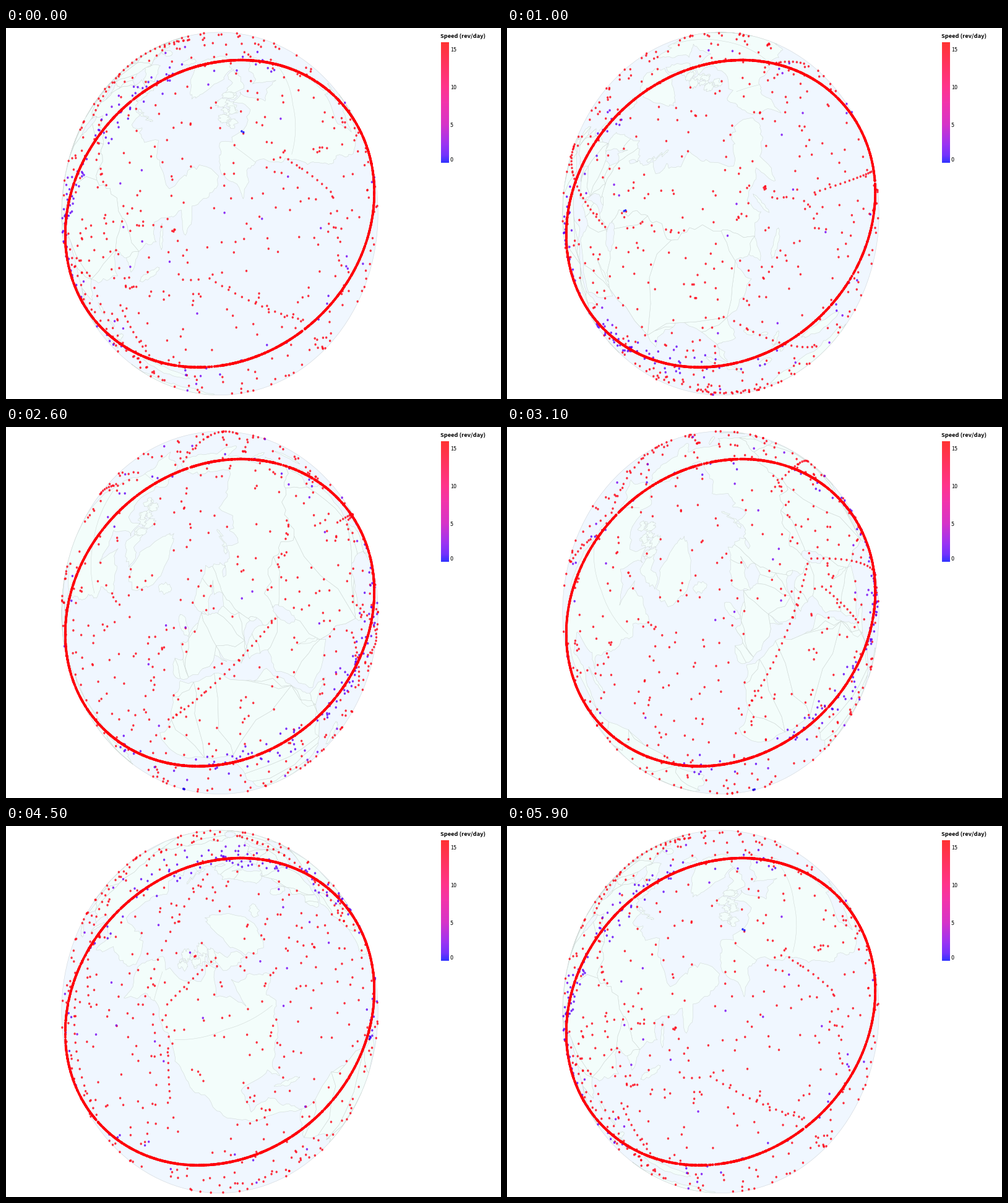
A matplotlib script for the animation above (6 s loop, 800 px wide and 600 px high).

```python
import matplotlib.pyplot as plt
import numpy as np
from matplotlib.animation import FuncAnimation
from matplotlib.collections import LineCollection, PolyCollection
from matplotlib.patches import Ellipse
from matplotlib.path import Path
from matplotlib.transforms import Affine2D

W, H, DPI = 800, 600, 100
FRAMES, INTERVAL = 60, 100
CX, CY, RX, RY = 345.5, 300.3, 255.7, 293.3
TILT, ROLL = np.radians(55), np.radians(22)
OCEAN, LAND, EDGE = "#f0f7ff", "#f3fdfb", "#d0d9d6"
FONT = "Noto Sans CJK JP"
TOP_SPEED, BAR_TOP, BAR_END = 15.93, 23, 218

# key points of the coasts; the detail is added by rough()
RUSSIA_WEST = [(28, 60), (32, 52), (39, 47), (40, 43.5)]
STEPPE = [(47.5, 42), (50, 51), (70, 55), (87, 49.3), (116, 49.8), (131, 43)]
ARCTIC = [(30, 69.5), (41, 67), (34, 64.5), (46, 68), (67, 69), (72, 73),
          (104, 77.7), (130, 71), (160, 69.7), (190, 66), (178, 62.5),
          (163, 60), (157, 51), (155, 59), (137, 54), (140, 48)]
ASIA_COAST = [(128.5, 35), (125, 39), (118, 39), (122, 31), (108, 21),
              (109, 12), (101, 13), (103.5, 1.5), (97, 17), (90, 22),
              (80, 14), (77.5, 8), (72, 21), (57, 26), (48, 30), (56, 25),
              (59, 22), (45, 13), (35, 28), (36, 36), (27, 37), (28, 41)]
EUROPE_COAST = [(30, 46), (28, 41), (23, 37), (14, 45.5), (17, 39.5), (9, 44),
                (-2, 37), (-9, 38), (-8, 43.3), (-1.5, 44), (-4.5, 48.3),
                (8, 54), (10, 57), (12, 54), (20, 55)]
NORDIC = [(28, 60), (30, 69.5), (24, 71), (13, 66), (5, 61), (8, 58),
          (14, 55.5), (18, 61), (25, 65.5), (22, 61)]
NORTH_AMERICA = [
    (-167, 66), (-156, 71.3), (-128, 70), (-96, 68), (-92, 72), (-82, 68),
    (-94, 60), (-82, 55), (-79, 52), (-78, 62), (-65, 59), (-56, 53),
    (-66, 50), (-64, 46), (-70, 43), (-76, 36), (-81, 31), (-80.5, 25.5),
    (-84, 30), (-97, 28), (-96, 19), (-88, 21), (-84, 15), (-78, 8.5),
    (-92, 14.5), (-105.5, 20), (-112, 30), (-118, 34), (-124, 42),
    (-128, 51), (-140, 60), (-152, 59.5), (-163, 55), (-161, 60)]
SOUTH_AMERICA = [(-78, 8.5), (-62, 10.7), (-50, 1), (-35, -6), (-41, -22),
                 (-54, -34), (-68, -52), (-72, -20), (-81, -5)]
AFRICA = [(-6, 35.8), (10, 37), (20, 31), (32, 31), (38, 20), (43, 12),
          (51, 11.8), (40, -4), (40, -15), (33, -28), (20, -35), (12, -17),
          (9, 4), (-8, 4.5), (-17, 15), (-10, 30)]
PARALLEL = [(-124, 49), (-95, 49), (-67, 46)]
MERIDIAN = [(-141, 69.6), (-141, 60)]

# islands: lon, lat, half length, half width (degrees of arc), slope
ISLANDS = [(-42, 72, 11, 5.5, 80), (-72, 68.5, 7, 2.3, -45),
           (-18.5, 65, 2.6, 1.3, 0), (-2.3, 53.8, 3.8, 1.4, 110),
           (57.5, 73.5, 4.6, .8, 55), (138, 36.5, 5, 1, 42),
           (142.7, 50, 4.2, .6, 95), (102, 0, 8, 1.5, -47),
           (140, -5, 9, 2.2, -18), (47, -19, 6.8, 2, 72),
           (-79, 21.8, 5.2, .6, -20), (134, -25, 17, 10, 0)]
CASPIAN = (51, 41.5, 5, 1.9, 110)


def rough(points, closed=True, amp=.13, levels=3):
    """Split every edge and push the midpoints off by a fixed wobble."""
    p = np.array(points, float)
    for _ in range(levels):
        q = np.roll(p, -1, axis=0)
        mid, size = (p + q) / 2, np.hypot(*(q - p).T)
        wobble = np.column_stack([np.sin(mid @ (37, 53)), np.sin(mid @ (71, -29))])
        mid += amp * size[:, None] * wobble
        p = np.stack([p, mid], axis=1).reshape(-1, 2)
        if not closed:
            p = p[:-1]
    return p


def split(shape, depth):
    """Cut a shape in two across its narrowest waist, again and again."""
    if depth == 0 or len(shape) < 6:
        return [shape]
    half = len(shape) // 2
    waist = np.hypot(*(shape[:half] - shape[half:2 * half]).T)
    i = int(waist.argmin())
    j = i + half
    parts = shape[i:j + 1], np.vstack([shape[j:], shape[:i + 1]])
    return split(parts[0], depth - 1) + split(parts[1], depth - 1)


def countries(coast, depth=0):
    return [rough(part, levels=2) for part in split(rough(coast, levels=1), depth)]


def island(lon, lat, a, b, slope):
    t, s = np.linspace(0, 2 * np.pi, 11)[:-1], np.radians(slope)
    x, y = a * np.cos(t), b * np.sin(t)
    dlon = (x * np.cos(s) - y * np.sin(s)) / np.cos(np.radians(lat))
    return rough(np.column_stack([lon + dlon, lat + x * np.sin(s) + y * np.cos(s)]),
                 amp=.2, levels=2)


def archipelago(rng, lon, lat, wide, high, count):
    return [island(lon + rng.uniform(-wide, wide), lat + rng.uniform(-high, high),
                   rng.uniform(1.2, 3.4), rng.uniform(.7, 1.8), rng.uniform(0, 180))
            for _ in range(count)]


# ---------------------------------------------------------------- projection
def project(points, lon0):
    lon, lat = np.radians(points[:, 0] - lon0), np.radians(points[:, 1])
    x, y, z = np.cos(lat) * np.cos(lon), np.cos(lat) * np.sin(lon), np.sin(lat)
    k = z * np.cos(TILT) - x * np.sin(TILT)
    depth = x * np.cos(TILT) + z * np.sin(TILT)
    right = y * np.cos(ROLL) - k * np.sin(ROLL)
    up = k * np.cos(ROLL) + y * np.sin(ROLL)
    return np.column_stack([right, up]), depth


def to_stage(flat):
    return np.column_stack([CX + RX * flat[:, 0], CY - RY * flat[:, 1]])


def locate(px, py, lon0, side):
    """Unit vector of a stage position on the near (1) or far (-1) side."""
    right, up = (px - CX) / RX, (CY - py) / RY
    y = right * np.cos(ROLL) + up * np.sin(ROLL)
    k = up * np.cos(ROLL) - right * np.sin(ROLL)
    depth = side * np.sqrt(max(0, 1 - right**2 - up**2))
    z = k * np.cos(TILT) + depth * np.sin(TILT)
    x = depth * np.cos(TILT) - k * np.sin(TILT)
    lon = np.arctan2(y, x) + np.radians(lon0)
    flat = np.hypot(x, y)
    return np.array([flat * np.cos(lon), flat * np.sin(lon), z])


def near_shapes(shapes, lon0):
    """Outlines of the near side; hidden points are pushed to the limb."""
    out = []
    for shape in shapes:
        flat, depth = project(shape, lon0)
        if (depth > 0).any():
            far = depth < 0
            flat[far] /= np.hypot(*flat[far].T)[:, None]
            out.append(to_stage(flat))
    return out


def near_lines(lines, lon0):
    out = []
    for line in lines:
        flat, depth = project(line, lon0)
        flat[depth < 0] = np.nan
        out.append(to_stage(flat))
    return out


# ---------------------------------------------------------------- satellites
# rows of satellites: viewing longitude, start x y, end x y, count, side
TRAINS = [(21.4, 270, 470, 435, 310, 25, 1), (180, 329, 405, 480, 472, 16, 1),
          (119, 367, 474, 500, 515, 15, 1), (180, 470, 222, 525, 265, 8, 1),
          (-45.8, 405, 224, 497, 226, 12, -1), (-45.8, 370, 195, 520, 115, 17, -1)]


def train(lon0, x0, y0, x1, y1, count, side):
    t = np.linspace(0, 1, count)[:, None]
    v = (1 - t) * locate(x0, y0, lon0, side) + t * locate(x1, y1, lon0, side)
    v /= np.linalg.norm(v, axis=1)[:, None]
    return np.degrees(np.column_stack([np.arctan2(v[:, 1], v[:, 0]), np.arcsin(v[:, 2])]))


def orbiters(rng, count, inclinations, weights):
    inc = np.radians(rng.choice(inclinations, count, p=weights))
    lat = np.arcsin(np.sin(inc) * np.sin(rng.uniform(0, 2 * np.pi, count)))
    return np.column_stack([rng.uniform(-180, 180, count), np.degrees(lat)])


def make_satellites(rng):
    """Positions, speeds and dot sizes of everything in orbit."""
    low = np.vstack([orbiters(rng, 440, [53, 70, 87, 35], [.5, .15, .27, .08])]
                    + [train(*t) for t in TRAINS])
    mid = orbiters(rng, 30, [56, 64], [.7, .3])
    lon = np.r_[rng.normal(50, 42, 95), rng.uniform(-180, 180, 30)]
    high = np.column_stack([lon, rng.normal(0, 3.6, lon.size)])
    still = np.array([(-21, -31), (-20.3, -30.6)])
    lon = rng.uniform(-180, 180, 3600)
    sparse = (abs(lon - 159.3) < 3) & (rng.random(lon.size) < .7)
    ring = np.column_stack([lon, 0 * lon])[~sparse]
    groups = [(low, 15), (mid, 2), (high, 1.4), (still, 0), (ring, 15.4)]
    speeds = np.concatenate([np.full(len(g), s) for g, s in groups])
    sizes = np.where(speeds == 15.4, 9.2, 7.8)
    return np.vstack([g for g, _ in groups]), speeds, sizes


def ramp(speed):
    stops = [0, .06, .15, .32, .5, .63, 1]
    red = [0, 78, 130, 205, 240, 255, 255]
    blue = [255, 252, 240, 187, 150, 112, 0]
    f = np.clip(np.asarray(speed) / TOP_SPEED, 0, 1)
    return np.column_stack([np.interp(f, stops, red) / 255, 0 * f,
                            np.interp(f, stops, blue) / 255, 0 * f + .8])


rng = np.random.default_rng(11)
LANDS = (countries(RUSSIA_WEST[::-1] + ARCTIC + STEPPE[::-1])
         + countries(STEPPE + ASIA_COAST + RUSSIA_WEST[-1:], 4)
         + countries(RUSSIA_WEST[:3] + EUROPE_COAST, 4)
         + countries(NORDIC, 1) + countries(NORTH_AMERICA)
         + countries(SOUTH_AMERICA, 3) + countries(AFRICA, 4)
         + [island(*i) for i in ISLANDS]
         + archipelago(rng, -100, 75, 20, 4, 9) + archipelago(rng, 120, 5, 6, 11, 7))
LAKES = [island(*CASPIAN)]
BORDERS = [rough(b, closed=False, amp=0) for b in (PARALLEL, MERIDIAN)]
SATELLITES, SPEEDS, SIZES = make_satellites(rng)

# --------------------------------------------------------------------- stage
fig = plt.figure(figsize=(W / DPI, H / DPI), dpi=DPI, facecolor="white")
ax = fig.add_axes([0, 0, 1, 1])
ax.axis("off")

ax.add_patch(Ellipse((CX, CY), 2 * RX, 2 * RY, fc=OCEAN, ec="#d3d9de", lw=.45, zorder=1))
land = ax.add_collection(PolyCollection([], fc=LAND, ec=EDGE, lw=.4, zorder=2))
lakes = ax.add_collection(PolyCollection([], fc=OCEAN, ec=EDGE, lw=.4, zorder=3))
borders = ax.add_collection(LineCollection([], colors=EDGE, lw=.4, zorder=4))
dot = Path.unit_circle().transformed(Affine2D().scale(.88, 1))
dots = ax.scatter(*SATELLITES.T, s=SIZES, marker=dot, c=ramp(SPEEDS), lw=0, zorder=5)

bar = ramp(np.linspace(TOP_SPEED, 0, BAR_END - BAR_TOP))[:, None, :]
ax.imshow(bar, extent=(703, 716, BAR_END, BAR_TOP), aspect="auto", zorder=6)
ax.text(702.5, 15.7, "Speed (rev/day)", family=FONT, weight="bold", size=6.7)
for value in (0, 5, 10, 15):
    y = BAR_END - (BAR_END - BAR_TOP) * value / TOP_SPEED
    ax.text(718, min(y, BAR_END - 5) + 3.5, str(value), family=FONT, size=6.4)
ax.set_xlim(0, W)
ax.set_ylim(H, 0)


def draw(i):
    # one full turn; the last picture equals the first
    lon0 = 180 - 360 * (i % (FRAMES - 1)) / (FRAMES - 1)
    land.set_verts(near_shapes(LANDS, lon0))
    lakes.set_verts(near_shapes(LAKES, lon0))
    borders.set_segments(near_lines(BORDERS, lon0))
    dots.set_offsets(to_stage(project(SATELLITES, lon0)[0]))
    return land, lakes, borders, dots


anim = FuncAnimation(fig, draw, frames=FRAMES, interval=INTERVAL, repeat=True)
plt.show()
```
